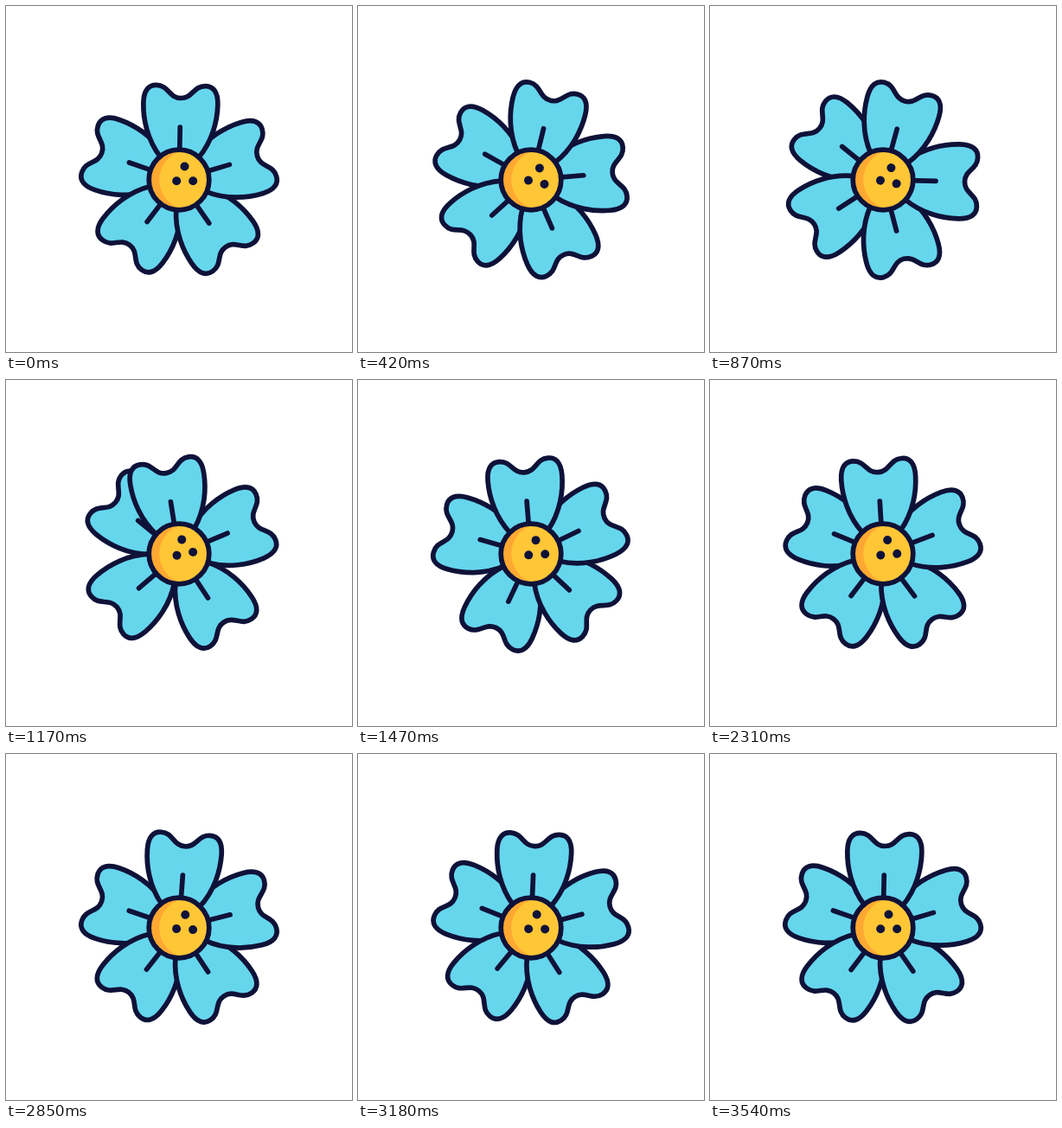
These frames come from a looping animation (400x400 px, 5570 ms). An HTML page:

```html
<!DOCTYPE html>
<html lang="en">
<head>
<meta charset="utf-8">
<title>Swaying flower</title>
<style>
  html, body { margin: 0; width: 100%; height: 100%; overflow: hidden; background: #fff; }
  svg { display: block; width: 100%; height: 100%; }
  .line { stroke: #0f1238; stroke-width: 5.7; stroke-linecap: round; stroke-linejoin: round; }
  .petal { fill: #66d6ed; }
</style>
</head>
<body>
<svg viewBox="0 0 400 400">
  <defs>
    <clipPath id="disc"><circle r="34.8"/></clipPath>
    <g id="petal" class="line">
      <path class="petal" d="M0 0L-22 -26C-38 -46 -43 -70 -43 -88C-43 -103 -37 -109 -28.5 -109
        C-14 -109 -14 -94.5 0 -94.5C14 -94.5 14 -109 28.5 -109C37 -109 43 -103 43 -88
        C43 -70 38 -46 22 -26Z"/>
      <path d="M0 -30V-61"/>
    </g>
  </defs>
  <g transform="translate(200 201)">
    <g id="petals"></g>
    <circle r="34.8" fill="#ffa832"/>
    <g clip-path="url(#disc)"><circle cx="12" r="34.8" fill="#ffc636"/></g>
    <circle r="34.8" class="line" fill="none"/>
    <g id="dots" fill="#0f1238">
      <circle cx="6.5" cy="-15.5" r="5"/>
      <circle cx="-2.8" cy="1.2" r="5"/>
      <circle cx="16.2" cy="1.2" r="5"/>
    </g>
  </g>
</svg>
<script>
const LOOP = 5570, STEP = 30, PETALS = 5, SWINGS = 5;

const ease = f => (1 - Math.cos(Math.PI * f)) / 2;

// extremes alternate sides and shrink until the part is at rest
const extreme = k => k < SWINGS ? 20 * (-0.62) ** k : 0;

// Each part winds up, holds, then swings back; later parts lag behind.
function sway(t, order) {
  const windUp = 720 + 30 * order;
  const release = 720 + 50 * order + 15 * order ** 2;
  const end = Math.min(3540, 3420 + 60 * order);
  if (t >= end) return 0;
  if (t < release) return extreme(0) * ease(Math.min(1, t / windUp));
  const phase = (t - release) / (end - release) * SWINGS;
  const k = Math.floor(phase);
  return extreme(k) + (extreme(k + 1) - extreme(k)) * ease(phase - k);
}

const layer = document.getElementById("petals");
const dots = document.getElementById("dots");
const petals = Array.from({ length: PETALS }, () => {
  const use = document.createElementNS("http://www.w3.org/2000/svg", "use");
  use.setAttribute("href", "#petal");
  layer.prepend(use); // the first petal lies on top
  return use;
});

const turn = (el, deg) => el.setAttribute("transform", `rotate(${deg.toFixed(3)})`);

function draw(now) {
  const t = Math.floor((now % LOOP) / STEP) * STEP;
  petals.forEach((petal, i) => turn(petal, 1.2 + i * 360 / PETALS + sway(t, i)));
  turn(dots, sway(t, -1));
}

const start = performance.now();
function tick() {
  draw(performance.now() - start);
  requestAnimationFrame(tick);
}
tick();
</script>
</body>
</html>
```
